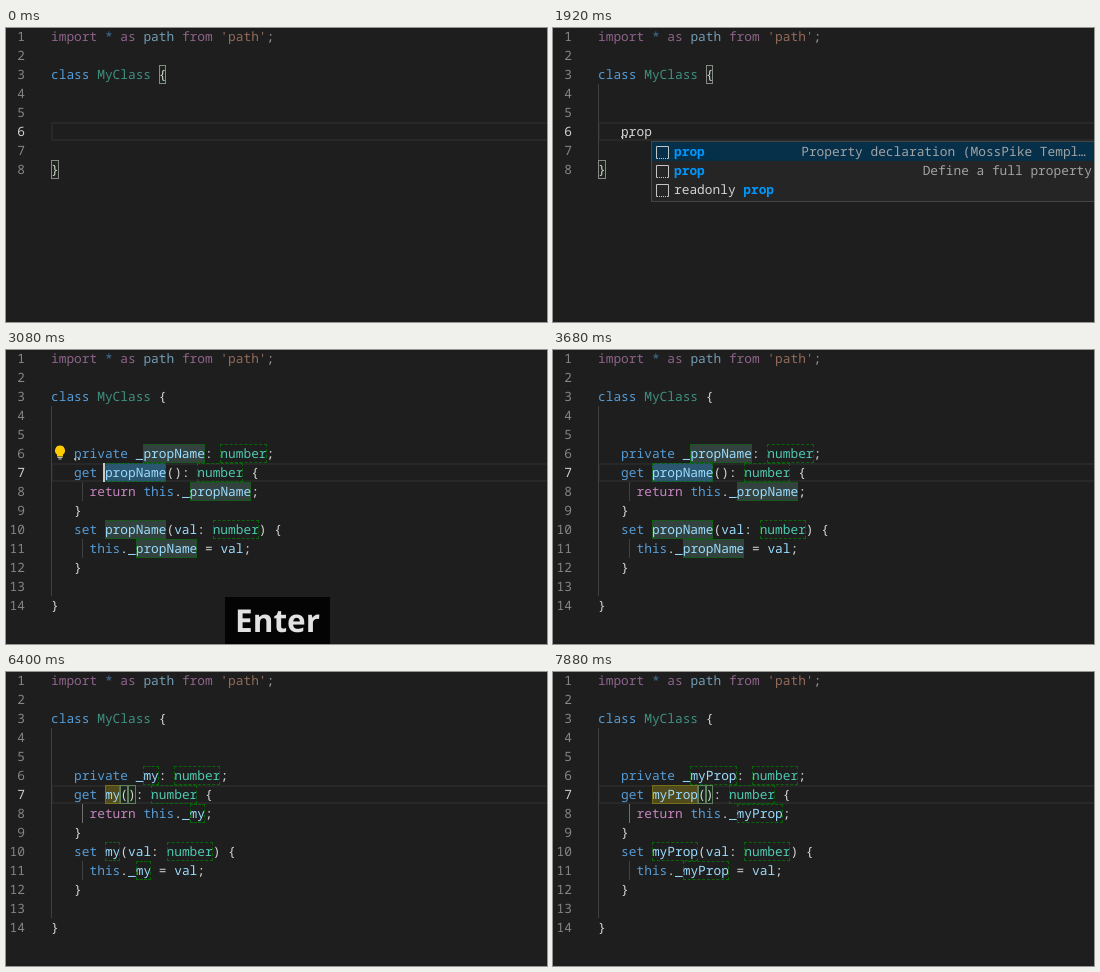
Recreate the animation shown at these times as an HTML page. Size 541 px wide and 294 px high, loop 8000 ms.

```html
<!DOCTYPE html>
<html lang="en">
<head>
<meta charset="utf-8">
<title>Property template</title>
<style>
html, body { margin: 0; width: 100%; height: 100%; overflow: hidden; background: #1e1e1e; }
#stage { position: relative; width: 541px; height: 294px; overflow: hidden;
  font: 12.833px/19px "Noto Sans Mono", "DejaVu Sans Mono", monospace;
  text-rendering: geometricPrecision; font-variant-ligatures: none; color: #d4d4d4; }
.layer { position: absolute; inset: 0; background: #1e1e1e; }
.layer > *, .pop > * , .item > * { position: absolute; white-space: pre; }
.row { height: 19px; }
.row span { display: inline-block; height: 19px; vertical-align: top; }
.faded { opacity: .667; }
.num { left: 0; width: 19px; text-align: right; color: #858585; }
.num.on { color: #d0d0d0; }
.current { left: 45px; width: 510px; height: 19px; box-sizing: border-box; border: 2px solid #282828; }
.guide { width: 1px; background: #404040; }
.guide.on { background: #707070; }
.caret { width: 2px; height: 19px; background: #c8c9c7; }
.kw { color: #569cd6; }
.ctl { color: #c586c0; }
.str { color: #ce9178; }
.var, .name { color: #9cdcfe; }
.cls, .type { color: #4ec9b0; }
.name, .type { outline: 1px dashed #086408; outline-offset: -1px; }
.selected .name { background: #33423f; }
.selected .name.main { background: #2a5670; }
.edited .name.main { background: #514a1c; outline: 1px solid #77701a; }
.pair { outline: 1px solid #888; outline-offset: -1px; background: rgba(0,100,0,.1); }
.pair.soft { outline-color: #5f805f; }
.pop { top: 113px; width: 451px; box-sizing: border-box; border: 1px solid #454545; background: #252526; }
.item { left: 0; width: 449px; height: 19px; }
.item.on { background: #062f4a; }
.item svg { left: 3px; top: 3px; fill: none; stroke: #c5c5c5; }
.label { left: 22px; }
.label b { color: #0097fb; }
.detail { right: 9px; color: #a2a2a2; }
.first .detail { right: 15px; }
#badge { position: absolute; left: 219px; top: 247px; width: 105px; height: 47px; background: rgba(0,0,0,.85);
  font: bold 31.5px/47px "Open Sans", "Noto Sans", sans-serif; color: #e2e2e2; text-align: center; }
</style>
</head>
<body>
<div id="stage">
  <div class="layer" id="before"></div>
  <div class="layer" id="after"></div>
  <div id="badge">Enter</div>
</div>
<script>
const LOOP = 8000, CELL = 7.7, LEFT = 45;
const $ = id => document.getElementById(id);
const x = col => LEFT + col * CELL;
const y = line => (line - 1) * 19 - 1;

// Value of the last step reached at time t; steps are [time, value].
const at = (t, steps) => steps.reduce((v, s) => t >= s[0] ? s[1] : v, steps[0][1]);

const SUGGESTIONS = [
  { label: 'private', key: 1 },
  { label: 'protected', key: 1 },
  { label: 'package', key: 1 },
  { label: 'public', key: 1 },
  { label: 'procedure' },
  { label: 'prop', focus: 'Property declaration (MossPike Templ…' },
  { label: 'private method', detail: 'Private Method Definition' },
  { label: 'prop', detail: 'Define a full property' },
  { label: 'arrow procedure' },
  { label: 'readonly prop' }
];
const KEY_ICON = '<path d="M0 2.5h7M9 2.5h5M0 5.5h5v3h-5zM7 6.5h4M0 11.5h7M8 9.5h6M9 11.5h4"/>';
const SNIP_ICON = '<path d="M3 13.5h-1.500v-12h12v12h-1.500"/><path d="M4 13.500h8" stroke-dasharray="1 1"/>';

const TYPED = [[0, ''], [880, 'p'], [1160, 'pr'], [1320, 'pro'], [1480, 'prop']];
const CARET = [[0, 0], [560, 1], [1880, 0], [2480, 1]];
const MIX = [[0, 0], [2760, .05], [2800, .2], [2880, .6], [2920, .8], [2960, 1]];
const BADGE = [[0, 0], [2720, .4], [2760, .8], [2800, 1], [3200, .66], [3240, .33], [3280, 0]];
const NAME = [[0, 'propName'], [5520, 'm'], [5920, 'my'], [6520, 'myP'], [6920, 'myPr'], [7240, 'myPro'], [7400, 'myProp']];
const SYNCED = [[0, 'propName'], [5600, 'm'], [6000, 'my'], [6600, 'myP'], [6920, 'myPr'], [7320, 'myPro'], [7400, 'myProp']];
const CARET2 = [[0, 1], [3680, 0], [4120, 1], [4680, 0], [5160, 1], [6400, 0], [6520, 1], [7880, 0]];

// parts alternates class and text
function row(line, col, parts, cls = '') {
  let s = '';
  for (let i = 0; i < parts.length; i += 2) s += `<span class="${parts[i]}">${parts[i + 1]}</span>`;
  return `<div class="row ${cls}" style="left:${x(col)}px;top:${y(line)}px">${s}</div>`;
}
const caret = (line, col) =>
  `<div class="caret" style="left:${Math.floor(x(col)) - 1}px;top:${y(line)}px"></div>`;
const guide = (px, from, to, on) =>
  `<div class="guide ${on ? 'on' : ''}" style="left:${px}px;top:${y(from)}px;height:${(to - from + 1) * 19}px"></div>`;

function frame(count, active) {
  let s = `<div class="current" style="top:${y(active)}px"></div>`;
  for (let n = 1; n <= count; n++)
    s += `<div class="num ${n === active ? 'on' : ''}" style="top:${y(n)}px">${n}</div>`;
  return s;
}
function header(brace) {
  return row(1, 0, ['ctl', 'import ', 'kw', '* ', 'ctl', 'as ', 'var', 'path ', 'ctl', 'from ', 'str', "'path'", '', ';'], 'faded') +
    row(3, 0, ['kw', 'class ', 'cls faded', 'MyClass', '', ' ', brace, '{']);
}
const bulb = '<svg style="left:46px;top:94px" width="15" height="17">' +
  '<path d="M8 1.500a5 5 0 0 0-3 9v2h6v-2a5 5 0 0 0-3-9z" fill="#ffcc00"/><path d="M5.500 13.500h5M6.500 15h3" stroke="#c5c5c5"/></svg>';
const hint = n => `<svg style="left:68px;top:107px" width="12" height="4" fill="#c8c8c8">` +
  [1, 5, 9].slice(0, n).map(c => `<circle cx="${c}" cy="2" r="1"/>`).join('') + '</svg>';

// Positions in label hit by the query, or null
function hits(label, q) {
  const i = label.indexOf(q);
  if (i >= 0) return [...q].map((_, k) => i + k);
  const out = [];
  let p = -1;
  for (const c of q) {
    p = label.indexOf(c, p + 1);
    if (p < 0) return null;
    out.push(p);
  }
  return out;
}
function popup(q) {
  const items = SUGGESTIONS.filter(s => hits(s.label, q));
  const rows = items.map((s, i) => {
    const h = hits(s.label, q);
    const label = [...s.label].map((c, k) => h.includes(k) ? `<b>${c}</b>` : c).join('').replace(/<\/b><b>/g, '');
    const detail = s.detail || (i === 0 && s.focus) || '';
    return `<div class="item ${i ? '' : 'on'} ${s.focus ? 'first' : ''}" style="top:${i * 19}px">` +
      `<svg width="15" height="15">${s.key ? KEY_ICON : SNIP_ICON}</svg>` +
      `<span class="label">${label}</span><span class="detail">${detail}</span></div>`;
  });
  return `<div class="pop" style="left:${Math.floor(x(3 + q.length))}px;height:${items.length * 19 + 4}px">${rows.join('')}</div>`;
}

function before(t) {
  const q = at(t, TYPED);
  return frame(8, 6) + (q ? guide(LEFT, 4, 7) : '') + header('pair') +
    row(6, 3, ['', q]) + row(8, 0, ['pair', '}']) +
    (t >= 1920 ? hint(3) : '') + (t >= 2120 ? bulb : '') +
    (at(t, CARET) ? caret(6, 3 + q.length) : '') +
    (t >= 960 ? popup(q) : '');
}

function after(t) {
  const own = at(t, NAME), all = at(t, SYNCED), edited = t >= 5520;
  const cls = edited ? 'edited' : 'selected';
  const paren = t >= 5680 ? 'pair soft' : '';
  return frame(14, 7) + guide(LEFT, 4, 13) + guide(76, 8, 8, edited) + guide(76, 11, 11) + header('') +
    row(6, 3, ['kw', 'private ', 'var', '_', 'name', all, '', ': ', 'type', 'number', '', ';'], cls) +
    row(7, 3, ['kw', 'get ', 'name main', own, paren, '(', paren, ')', '', ': ', 'type', 'number', '', ' {'], cls) +
    row(8, 5, ['ctl', 'return ', 'kw', 'this', '', '.', 'var', '_', 'name', all, '', ';'], cls) +
    row(9, 3, ['', '}']) +
    row(10, 3, ['kw', 'set ', 'name', all, '', '(', 'var', 'val', '', ': ', 'type', 'number', '', ') {'], cls) +
    row(11, 5, ['kw', 'this', '', '.', 'var', '_', 'name', all, '', ' = ', 'var', 'val', '', ';'], cls) +
    row(12, 3, ['', '}']) + row(14, 0, ['', '}']) +
    (t < 3440 ? bulb : '') + (t < 3480 ? hint(2) : '') +
    (at(t, CARET2) ? caret(7, 7 + (edited ? own.length : 0)) : '');
}

const shown = {};
function put(id, html) {
  if (shown[id] !== html) $(id).innerHTML = shown[id] = html;
}
function draw(now) {
  const t = now % LOOP, mix = at(t, MIX);
  if (mix < 1) put('before', before(t));
  if (mix > 0) put('after', after(t));
  $('after').style.opacity = mix;
  $('badge').style.opacity = at(t, BADGE);
}
const start = performance.now();
function tick() {
  draw(performance.now() - start);
  requestAnimationFrame(tick);
}
tick();
</script>
</body>
</html>
```
